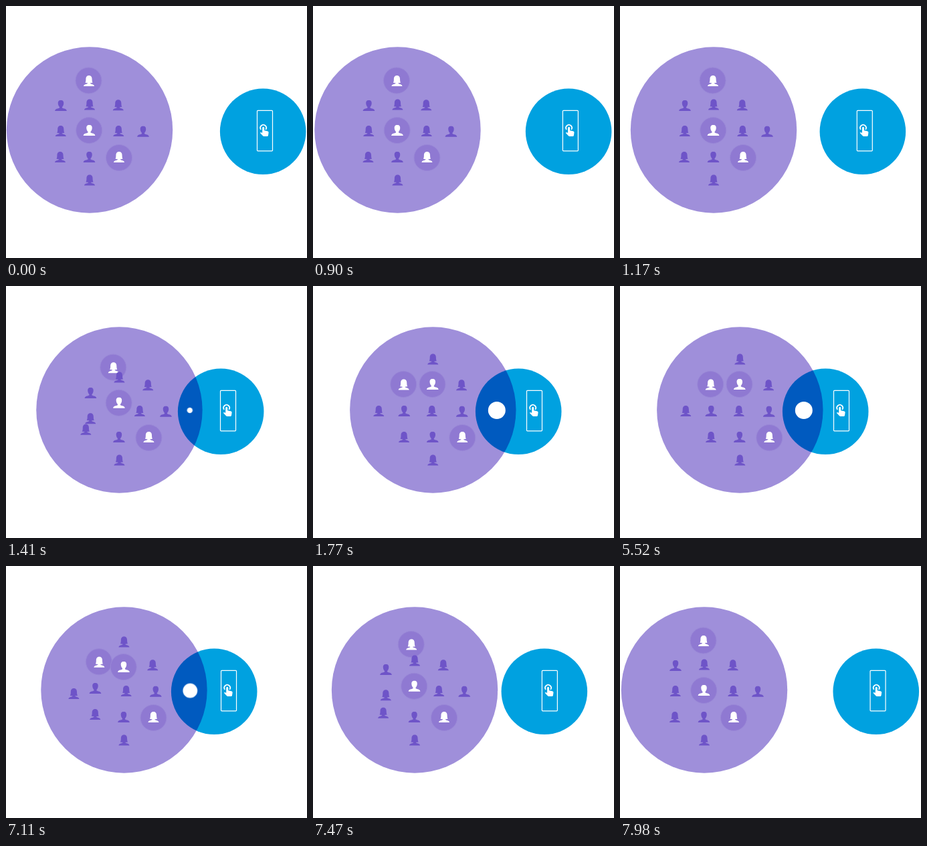
Animation, 450 px wide and 377 px high, one loop 8 s. Source, as an HTML page without scripts:

```html
<!DOCTYPE html>
<html lang="en">
<head>
<meta charset="utf-8">
<title>Users meet device</title>
<style>
  /* slide: circles, shuffle: people, shift: phone inside its circle */
  @property --slide { syntax: "<number>"; inherits: true; initial-value: 0; }
  @property --shuffle { syntax: "<number>"; inherits: true; initial-value: 0; }
  @property --shift { syntax: "<number>"; inherits: true; initial-value: 0; }

  html, body { margin: 0; width: 100%; height: 100%; overflow: hidden; background: #fff; }
  svg {
    display: block; width: 450px; height: 377px; isolation: isolate;
    animation: slide 8s infinite, shuffle 8s infinite, shift 8s infinite;
  }

  .users { translate: calc(54.3px * var(--slide)); fill: #6e54c8; }
  .device { translate: calc(-77px * var(--slide)); fill: #00a1e0; mix-blend-mode: multiply; }
  .phone { translate: calc(-77px * var(--slide) + 21px * var(--shift)); fill: #fff; }
  .phone .line { fill: none; stroke: #fff; }

  .move {
    --x: 0; --y: 0; --bow: 0;
    translate:
      calc((var(--x) + var(--bow) * (1 - var(--shuffle))) * var(--shuffle) * 1px)
      calc(var(--y) * var(--shuffle) * 1px);
  }
  .star { fill: #fff; }
  .star circle { fill: #8f79d2; stroke: #9987d7; }

  .badge {
    fill: #fff; transform-box: fill-box; transform-origin: center;
    animation: pop 8s infinite;
  }

  @keyframes slide {
    0%, 8.375% { --slide: 0; animation-timing-function: cubic-bezier(.333, 0, .667, 0); }
    14.625% { --slide: .275; animation-timing-function: cubic-bezier(.333, .27, .667, .857); }
    18.375% { --slide: .9; animation-timing-function: cubic-bezier(.25, .6, .5, 1); }
    22.125% { --slide: 1; }
    86.75% { --slide: 1; animation-timing-function: cubic-bezier(.333, 0, .667, .333); }
    93.375% { --slide: .5; animation-timing-function: cubic-bezier(.333, .72, .667, .935); }
    100% { --slide: .015; }
  }
  @keyframes shuffle {
    0%, 15% { --shuffle: 0; animation-timing-function: cubic-bezier(.45, 0, .55, 1); }
    22% { --shuffle: 1; }
    87% { --shuffle: 1; animation-timing-function: cubic-bezier(.4, 0, .7, .7); }
    93.375% { --shuffle: .16; animation-timing-function: cubic-bezier(.3, .55, .6, 1); }
    95.6%, 100% { --shuffle: 0; }
  }
  @keyframes shift {
    0%, 14.2% { --shift: 0; animation-timing-function: cubic-bezier(.45, 0, .55, 1); }
    22.1% { --shift: 1; }
    87% { --shift: 1; animation-timing-function: cubic-bezier(.4, 0, .7, .7); }
    93.375% { --shift: .25; animation-timing-function: cubic-bezier(.3, .55, .6, 1); }
    97.5%, 100% { --shift: 0; }
  }
  @keyframes pop {
    0%, 16.5% { transform: translate(0, 0) scale(0); animation-timing-function: ease-out; }
    22%, 87% { transform: translate(0, 0) scale(1); animation-timing-function: ease-in-out; }
    93.4% { transform: translate(2.5px, 2.5px) scale(.1); }
    93.8%, 100% { transform: translate(2.5px, 2.5px) scale(0); }
  }
</style>
</head>
<body>
<svg viewBox="0 0 450 377">
  <defs>
    <path id="woman" d="M0-8C-3.5-8-4.6-5.5-4.6-2C-4.6 0-5 1.8-5.5 2.8L-2 3.2V4C-4 5-7.6 5-8 8H8C7.6 5 4 5 2 4V3.2L5.5 2.8C5 1.8 4.6 0 4.6-2C4.6-5.5 3.5-8 0-8Z"/>
    <path id="man" d="M0-8C-3.4-8-4.4-6-4.2-3C-4-.5-3 1-2 2V3.5C-4 4.5-8.6 4.6-8.8 8H8.8C8.6 4.6 4 4.5 2 3.5V2C3 1 4-.5 4.2-3C4.4-6 3.4-8 0-8Z"/>
  </defs>

  <rect width="450" height="377" fill="#fff"/>

  <g class="users">
    <circle cx="125" cy="185.5" r="124.2" fill="#9f8fda"/>

    <g class="star move" style="--x:-42.6; --y:35.5; --bow:22">
      <circle cx="123.5" cy="111.5" r="19.5"/>
      <use href="#woman" x="124" y="112"/>
    </g>
    <g class="star move" style="--y:-39">
      <circle cx="124.2" cy="186" r="19.5"/>
      <use href="#man" x="124.5" y="186"/>
    </g>
    <g class="star">
      <circle cx="169" cy="227" r="19.5"/>
      <use href="#woman" x="169" y="226"/>
    </g>

    <use class="move" style="--y:38" href="#man" x="82" y="149"/>
    <use class="move" style="--y:-38" href="#woman" x="125" y="147.5"/>
    <use href="#woman" x="167.8" y="148.3"/>
    <use class="move" style="--y:39" href="#woman" x="81.8" y="187"/>
    <use class="move" style="--x:-44.8" href="#woman" x="168.3" y="187"/>
    <use class="move" style="--x:-36.5" href="#man" x="205" y="187.7"/>
    <use class="move" style="--x:-37; --y:-39; --bow:22" href="#woman" x="81" y="226"/>
    <use href="#man" x="124.5" y="226"/>
    <use href="#woman" x="125" y="260.6"/>
  </g>

  <circle class="device" cx="384.2" cy="187.8" r="64.3"/>

  <g class="phone">
    <rect class="line" x="375.5" y="156.4" width="23" height="60.4" rx="1" stroke-width="1.2"/>
    <path class="line" d="M381.2 184.9A4.4 4.4 0 1 1 388.2 184.9" stroke-width="1.8"/>
    <path d="M383.2 182.2a1.5 1.5 0 0 1 3 0V186.3L391 187.3Q392.8 187.8 392.6 189.5L392 193.5Q391.8 195 390.3 195H385.5Q384.6 195 384 194.3L379.8 189.8L380.8 188.9L383.2 189.7Z"/>
  </g>

  <circle class="badge" cx="274.8" cy="186" r="13"/>
</svg>
</body>
</html>
```
